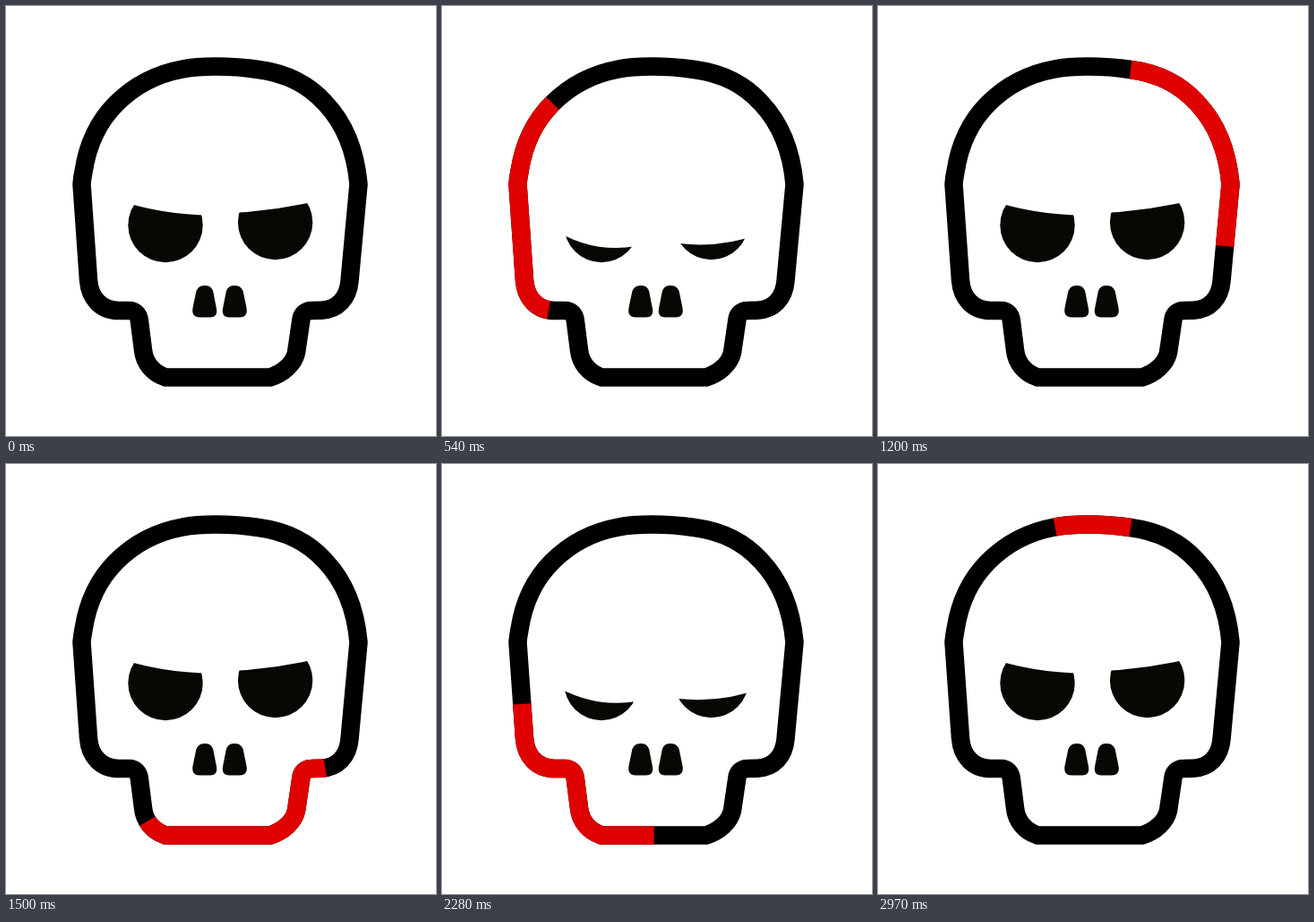
Write an HTML page without scripts that moves like this. It is 480x480 px and loops after 3000 ms.

```html
<!DOCTYPE html>
<html lang="en">
<head>
<meta charset="utf-8">
<title>Skull loader</title>
<style>
  @property --tick { syntax: "<integer>"; inherits: true; initial-value: 0; }

  html, body { margin: 0; width: 100%; height: 100%; overflow: hidden; background: #fff; }

  svg {
    display: block; width: 100%; height: 100%;
    animation: clock 3s -5ms infinite;

    /* runner: 14 ticks per lap, tail three units behind once it is up to speed */
    --step: mod(var(--tick), 14);
    --tail: max(var(--step) - 2, round(down, var(--step) / 2, 1));
    --len: calc((var(--step) + 1 - var(--tail)) * min(1, 13 - var(--step)));

    /* blink: a cosine bump in the middle of every 1.4 s */
    --phase: clamp(-1, (mod(var(--tick), 46.67) - 23.33) / 15.6, 1);
    --shut: calc(.5 + .5 * cos(var(--phase) * 180deg));
  }
  /* counts 30 ms ticks: idle at first, resting on the last */
  @keyframes clock {
    from { --tick: -1; animation-timing-function: step-end; }
    1% { --tick: 1; animation-timing-function: steps(97); }
    98%, to { --tick: 98; }
  }

  .bone { fill: none; stroke: #000; stroke-width: 20.5; }
  .run {
    stroke: #df0000;
    stroke-dasharray: 0px calc(1px * var(--tail)) calc(1px * var(--len)) 40px;
  }

  .hole { fill: #070703; }
  .lid {
    fill: #fff;
    transform:
      translateY(calc(53.5px * var(--shut)))
      rotate(calc(var(--tilt) + var(--turn) * var(--shut)))
      scaleY(calc(var(--bow) * (.3 + .7 * var(--shut))));
  }
  .left { --tilt: 8.8deg; --turn: -1.8deg; --bow: 1; }
  .right { --tilt: -8.1deg; --turn: 5.8deg; --bow: .65; }
</style>
</head>
<body>
<svg viewBox="0 0 480 480">
  <defs>
    <path id="skull" pathLength="13" d="M282 71
      C266 68.5 250 67.5 234 67.5 C221 67.5 209 68 197 70.5
      C167 76 143 89 123 109 C103 129 91 155 86.5 185 Q85 192 84.5 199
      L92 306 C93.5 326 106 340 126 340 H137
      C144 340 148 344 148.8 351 L153 384
      C154.5 398 163 409 178 414.5 H295
      C309 410 321 400 324 387 L329.3 351
      C330 344 334.5 340 341 340 L352 339.7
      C370 339 382 326 383.5 307 L393.5 199
      C390 160 376 129 356 108 C337 87 312 75 282 71Z"/>
    <path id="nostril" d="M222 312C228 312 230.5 315.5 231.5 320L235 338C236.2 344.5 233 347.5 228 347.5
      H216C209.5 347.5 207.3 343 208.5 337L212 320C213 315.5 216 312 222 312Z"/>
    <g id="eye">
      <circle class="hole" cy="15" r="41.7"/>
      <path class="lid" d="M-60 -18Q0 18 60 -18V-300H-60Z"/>
    </g>
  </defs>

  <use href="#eye" class="left" x="178" y="229.5"/>
  <use href="#eye" class="right" x="300.6" y="226.5"/>

  <use href="#nostril" class="hole"/>
  <use href="#nostril" class="hole" transform="translate(477) scale(-1 1)"/>

  <use href="#skull" class="bone"/>
  <use href="#skull" class="bone run"/>
</svg>
</body>
</html>
```
